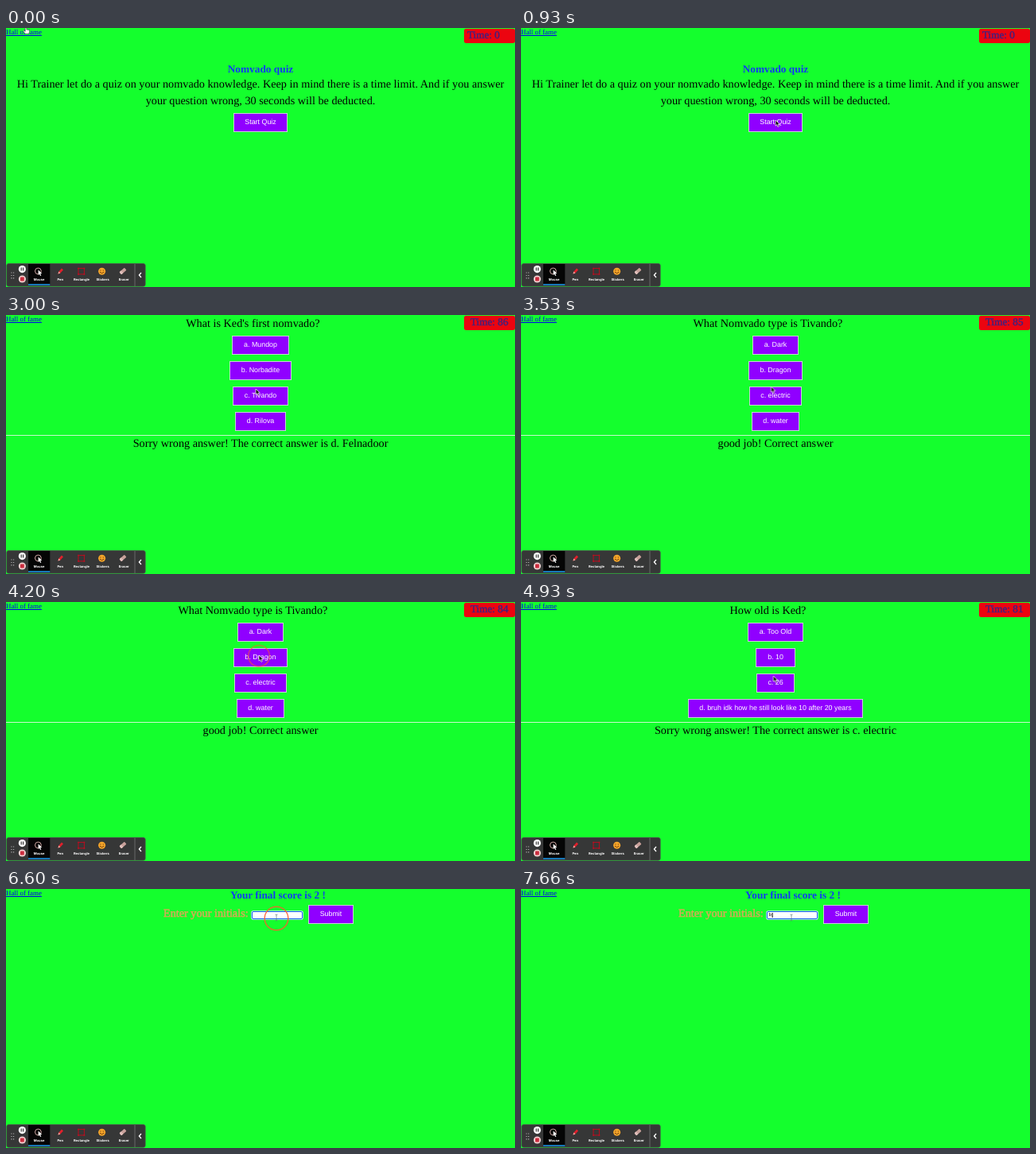
These frames come from a looping animation (640 px wide and 326 px high, 8000 ms). An HTML page:

```html
<!DOCTYPE html>
<html lang="en">
<head>
<meta charset="utf-8">
<title>Quiz</title>
<style>
html, body { margin: 0; width: 100%; height: 100%; overflow: hidden; background: #14ff2d; }
body { font: 14.22px/16px "Liberation Serif", Times, serif; color: #000; text-rendering: geometricPrecision; }
#stage { position: absolute; left: 0; top: 0; width: 640px; height: 326px; overflow: hidden; background: #14ff2d; }
#reel, #timer, #ticks, #pointer, .hand, .arrow, .beam, .ring, .typed, .caret { animation: 8s step-end infinite; }

/* Screens stacked in a column, one visible at a time */
#reel { position: absolute; left: 0; top: 0; animation-name: reel; }
section { position: relative; width: 640px; height: 326px; overflow: hidden; }
section > * { position: absolute; margin: 0; }
p, h2 { left: 0; width: 640px; text-align: center; white-space: nowrap; }
h2 { font-size: 13.33px; color: #103cf0; }
.question { left: -9.6px; top: 3.3px; }
.feedback { top: 154.4px; }
.intro { top: 60.8px; line-height: 21.33px; }
hr { left: 0; top: 151px; width: 640px; height: 1px; border: 0; background: #c8f8cc; }
.answers { left: 0; top: 25.8px; width: 640px; display: flex; flex-direction: column; align-items: center; gap: 8.4px; }
.btn { box-sizing: border-box; height: 23.8px; padding: 0 13.7px; border: 1px solid #c4d4d4; background: #9000ff; color: #fff;
  font: 8.89px/21.8px "Liberation Sans", Arial, sans-serif; white-space: nowrap; }
.prompt { left: 198px; top: 23px; width: auto; color: #b9b36a; -webkit-text-stroke: .45px #f0a04a; }
.field { box-sizing: border-box; left: 309px; top: 28px; width: 64px; height: 10px; border: 1px solid #1560e8; border-radius: 2px;
  background: #fff; box-shadow: 0 0 0 .8px #cfe6ff; font: 5.9px/8px "Liberation Sans", Arial, sans-serif; color: #000; }
.typed, .caret { position: absolute; left: 1.5px; top: 0; }
.typed { animation-name: typed; }
.caret { top: 1px; width: .7px; height: 6px; background: #000; animation-name: caret; }

/* Fixed page parts */
#link { position: absolute; left: 0; top: 0; font-size: 8.89px; line-height: 10px; color: #0000ee; text-decoration: underline; }
#timer { position: absolute; left: 576px; top: 1px; width: 64px; height: 18px; border-radius: 3px; overflow: hidden; background: #ec0410;
  box-shadow: 0 0 1px #b05a10; font-size: 13.2px; line-height: 18px; color: #4c1668; -webkit-text-stroke: .5px #4a2480; animation-name: timer; }
#ticks { animation-name: ticks; }
#ticks div { height: 18px; margin-top: -1px; padding: 0 0 1px 8px; }
#ticks div:first-child { padding-left: 4px; }
svg { position: absolute; left: 0; top: 0; overflow: visible; }
.labels { font: 700 4.1px Inter, "Open Sans", sans-serif; fill: #fff; text-anchor: middle; }

/* Pointer */
#pointer { animation-name: move; animation-timing-function: ease-in-out; }
.hand { animation-name: hand; }
.arrow { animation-name: arrow; }
.beam { animation-name: beam; }
.ring { animation-name: ring; animation-timing-function: linear; }

@keyframes reel {
  0% { transform: none; }
  13.25% { transform: translateY(-326px); }
  31.25% { transform: translateY(-652px); }
  41.625% { transform: translateY(-978px); }
  53.375% { transform: translateY(-1304px); }
  70%, 100% { transform: translateY(-1630px); }
}
@keyframes ticks {
  0% { transform: none; }
  13.25% { transform: translateY(-18px); }
  26.25% { transform: translateY(-36px); }
  31.25% { transform: translateY(-54px); }
  38.75% { transform: translateY(-72px); }
  51.25% { transform: translateY(-90px); }
  53.375% { transform: translateY(-108px); }
  63.75%, 100% { transform: translateY(-126px); }
}
@keyframes timer { 0% { visibility: visible; } 70%, 100% { visibility: hidden; } }
@keyframes typed { 0% { opacity: 0; } 94.125%, 100% { opacity: 1; } }
@keyframes caret {
  0% { opacity: 0; }
  83.25% { opacity: 1; transform: none; }
  89.125% { opacity: 0; transform: none; }
  94.125%, 100% { opacity: 1; transform: translateX(3.6px); }
}
@keyframes move {
  0%, .75% { transform: translate(25px, 0); }
  10.75%, 18.25% { transform: translate(320px, 116px); animation-timing-function: ease-in; }
  22.5% { transform: translate(309.6px, 50.3px); animation-timing-function: ease-out; }
  25% { transform: translate(311px, 38px); }
  29.125%, 42.75% { transform: translate(314px, 93px); }
  48.75%, 54% { transform: translate(318px, 67px); }
  66.25%, 75% { transform: translate(317px, 104px); }
  81.25%, 100% { transform: translate(340px, 36px); }
}
@keyframes hand { 0% { opacity: 1; } 2%, 100% { opacity: 0; } }
@keyframes arrow { 0% { opacity: 0; } 2% { opacity: 1; } 80%, 100% { opacity: 0; } }
@keyframes beam { 0% { opacity: 0; } 80%, 100% { opacity: 1; } }
@keyframes ring {
  0%, 12% { opacity: 0; transform: scale(.8); }
  12.4%, 13.6% { opacity: .8; transform: none; }
  15.2%, 30% { opacity: 0; transform: scale(.8); }
  30.4%, 31.6% { opacity: .8; transform: none; }
  33.2%, 40.4% { opacity: 0; transform: scale(.8); }
  40.8%, 42% { opacity: .8; transform: none; }
  43.2%, 51.3% { opacity: 0; transform: scale(.8); }
  51.7%, 52.8% { opacity: .7; transform: scale(.9); }
  54%, 68.6% { opacity: 0; transform: scale(.8); }
  69%, 70% { opacity: .75; transform: scale(.95); }
  71.6%, 81.7% { opacity: 0; transform: scale(.8); }
  82.2%, 84% { opacity: .85; transform: none; }
  86%, 100% { opacity: 0; transform: scale(.8); }
}
</style>
</head>
<body>
<div id="stage">
  <div id="reel">
    <section>
      <h2 style="top:44.4px">Nomvado quiz</h2>
      <p class="intro">Hi Trainer let do a quiz on your nomvado knowledge. Keep in mind there is a time limit. And if you answer<br>your question wrong, 30 seconds will be deducted.</p>
      <div class="answers" style="top:107px"><div class="btn">Start Quiz</div></div>
    </section>
    <section>
      <p class="question">What is the first Nomvádo in the Nomvári?</p>
      <div class="answers">
        <div class="btn">a. drelpax</div><div class="btn">b. Wob</div>
        <div class="btn">c. Gorvitund</div><div class="btn">d. Felnadoor</div>
      </div>
    </section>
    <section>
      <p class="question">What is Ked's first nomvado?</p>
      <div class="answers">
        <div class="btn">a. Mundop</div><div class="btn">b. Norbadite</div>
        <div class="btn">c. Tivando</div><div class="btn">d. Rilova</div>
      </div>
      <hr>
      <p class="feedback">Sorry wrong answer! The correct answer is d. Felnadoor</p>
    </section>
    <section>
      <p class="question">What Nomvado type is Tivando?</p>
      <div class="answers">
        <div class="btn">a. Dark</div><div class="btn">b. Dragon</div>
        <div class="btn">c. electric</div><div class="btn">d. water</div>
      </div>
      <hr>
      <p class="feedback">good job! Correct answer</p>
    </section>
    <section>
      <p class="question">How old is Ked?</p>
      <div class="answers">
        <div class="btn">a. Too Old</div><div class="btn">b. 10</div>
        <div class="btn">c. 26</div><div class="btn">d. bruh idk how he still look like 10 after 20 years</div>
      </div>
      <hr>
      <p class="feedback">Sorry wrong answer! The correct answer is c. electric</p>
    </section>
    <section>
      <h2 style="top:-.3px; left:22px">Your final score is 2 !</h2>
      <p class="prompt">Enter your initials:</p>
      <div class="field"><span class="typed">b</span><span class="caret"></span></div>
      <div class="btn" style="left:380px; top:20px">Submit</div>
    </section>
  </div>

  <div id="link">Hall of fame</div>
  <div id="timer"><div id="ticks">
    <div>Time: 0</div><div>Time: 90</div><div>Time: 89</div><div>Time: 86</div>
    <div>Time: 85</div><div>Time: 84</div><div>Time: 81</div><div>Time: 80</div>
  </div></div>

  <svg width="640" height="326" viewBox="0 0 640 326">
    <!-- Recorder bar -->
    <rect x=".8" y="296.5" width="174.4" height="28.7" rx="2.5" fill="#363737" stroke="#4c584e" stroke-width=".7"/>
    <path d="M7 307.5v8M9.6 307.5v8" stroke="#bbb" stroke-width="1.1" stroke-dasharray="1.1 2.3"/>
    <circle cx="20.4" cy="303.6" r="4.6" fill="#fff"/>
    <path d="M19.2 301.6v4M21.6 301.6v4" stroke="#222" stroke-width="1.1"/>
    <circle cx="20.4" cy="316" r="4.6" fill="#f0d0d0"/>
    <rect x="18" y="313.6" width="4.8" height="4.8" rx=".6" fill="#cc2c3e"/>
    <rect x="28" y="297" width="27.3" height="26.5" fill="#050505"/>
    <rect x="28" y="322.2" width="27.3" height="1.6" fill="#1a8fe0"/>
    <circle cx="40.4" cy="306" r="3.9" fill="none" stroke="#e4b8b4" stroke-width=".9"/>
    <path d="M40.6 304.6l4.6 4.4-2.1.2 1.2 2.3-1.2.5-1.1-2.3-1.4 1.4z" fill="#fff"/>
    <path d="M65.4 309.6l1-3 3.6-4 2 1.8-3.6 4z" fill="#e0202c"/>
    <path d="M65.4 309.6l1-3 1.9 1.8z" fill="#f4b0a8"/>
    <rect x="91" y="302.5" width="7.4" height="7.4" fill="none" stroke="#b01020" stroke-width="1.1"/>
    <path d="M91 302.5h0M98.4 302.5h0M91 309.9h0M98.4 309.9h0" stroke="#b81022" stroke-width="1.7" stroke-linecap="square"/>
    <circle cx="120.6" cy="306.2" r="4.5" fill="#f4a52a"/>
    <path d="M118.9 304.4v1.2M122.3 304.4v1.2M118 307.2q2.6 3 5.2 0" fill="none" stroke="#6a3408" stroke-width=".9"/>
    <g transform="rotate(-42 147 306)">
      <rect x="142.8" y="304" width="8.4" height="4" rx=".8" fill="#c8a09a"/>
      <rect x="142.8" y="304" width="3" height="4" rx=".8" fill="#e0c0bc"/>
    </g>
    <path d="M162 297v28" stroke="#777" stroke-width=".8"/>
    <path d="M170 308l-2.6 3 2.6 3" fill="none" stroke="#fff" stroke-width="1.3"/>
    <g class="labels">
      <text x="41.6" y="317.8">Mouse</text><text x="68.3" y="317.8">Pen</text><text x="95" y="317.8">Rectangle</text>
      <text x="121.6" y="317.8">Stickers</text><text x="148.3" y="317.8">Eraser</text>
    </g>
    <!-- Pointer, hot spot at 0,0 -->
    <g id="pointer">
      <circle class="ring" cx="0" cy="1" r="14.8" fill="none" stroke="#ff5a2c" stroke-width="1.5"/>
      <path class="hand" d="M-.8-1q.8-.8 1.6 0v3l3 .6q1 .4.8 1.6l-.8 3h-4.6l-2.6-3.4q.6-1 1.6-.2l1 .8z" fill="#fff" stroke="#333" stroke-width=".5"/>
      <path class="arrow" d="M0 0v7.2l1.7-1.6 1.2 2.8 1.4-.6-1.2-2.7h2.3z" fill="#111" stroke="#fff" stroke-width=".7"/>
      <path class="beam" d="M-1.5-4q1.5 0 1.5 1 0-1 1.5-1M0-3v6M-1.5 4q1.5 0 1.5-1 0 1 1.5 1" fill="none" stroke="#5a7a7a" stroke-width=".7"/>
    </g>
  </svg>
</div>
</body>
</html>
```
